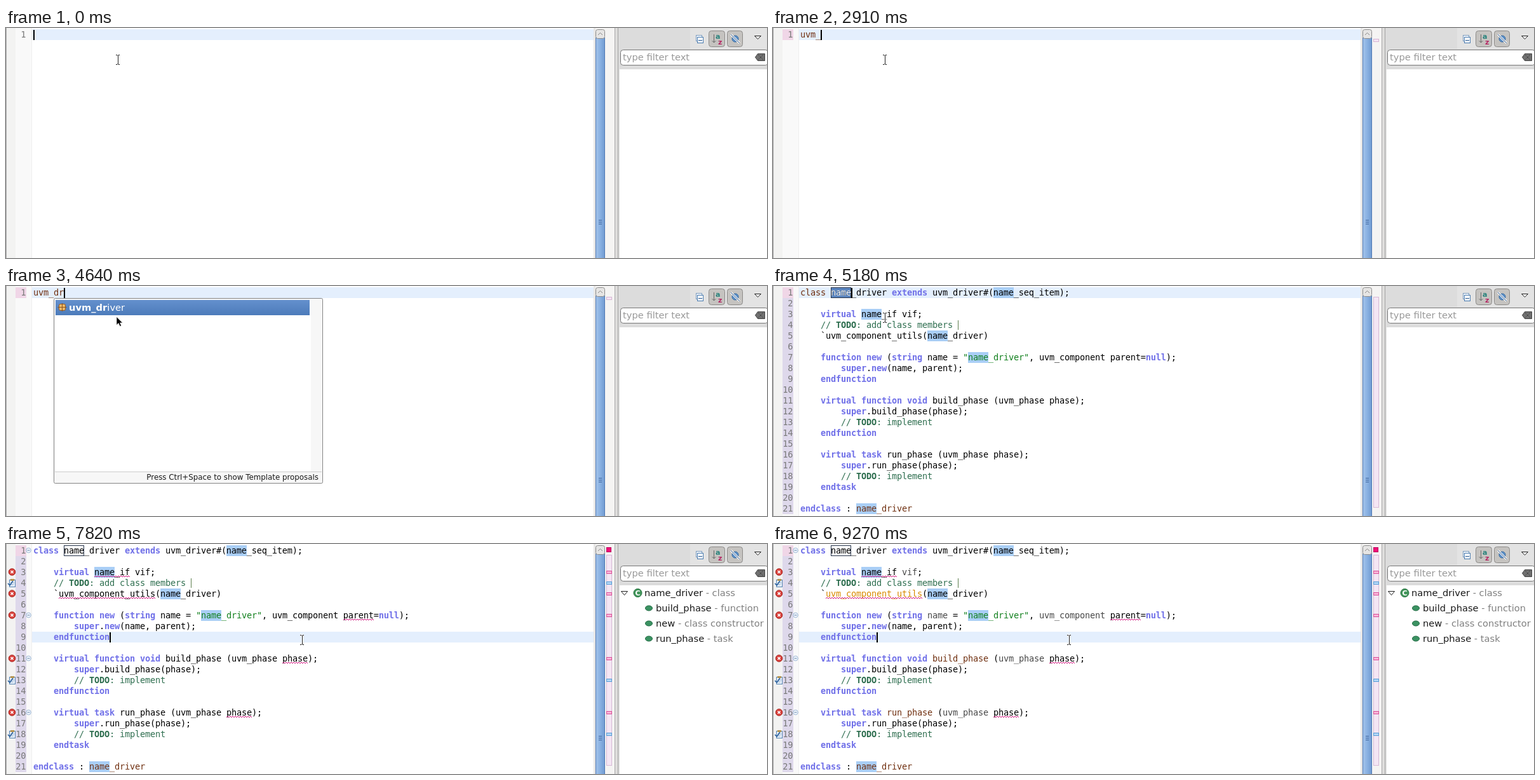
Write an HTML page that moves like this. It is 1198 by 362 pixels and loops after 9.36 s.

```html
<!DOCTYPE html>
<html lang="en">
<head>
<meta charset="utf-8">
<title>Code template demo</title>
<style>
html, body { margin: 0; width: 100%; height: 100%; overflow: hidden; background: #fff; }
svg { display: block; width: 1198px; height: 362px; }
text { white-space: pre; }
.mono { font: 13.6px "DejaVu Sans Mono", monospace; letter-spacing: -.188px; }
.ui { font: 14.67px "DejaVu Sans", sans-serif; fill: #1a1a1a; }
.kw { fill: #7070e8; font-weight: bold; }
.com { fill: #2f6f50; }
.str { fill: #12801e; }
.todo, .bold { font-weight: bold; }
.br, .c { fill: #703010; }
.num { fill: #787878; text-anchor: end; }
.dim { fill: #808080; }
.checked .c { fill: #7070e8; font-weight: bold; }
.colored .m { fill: #d98a00; }
.colored .f { fill: #703010; }
.colored .v { fill: #484848; }
</style>
</head>
<body>
<svg id="stage" viewBox="0 0 1198 362" xmlns="http://www.w3.org/2000/svg">
  <defs>
    <linearGradient id="thumb"><stop stop-color="#a3c3ea"/><stop offset=".5" stop-color="#8ab1e2"/><stop offset="1" stop-color="#709bd2"/></linearGradient>
    <linearGradient id="selected" x2="0" y2="1"><stop stop-color="#6490cd"/><stop offset="1" stop-color="#4c7bba"/></linearGradient>
    <clipPath id="list"><path d="M78 22H480V292H78Z"/></clipPath>
  </defs>
  <g id="frame"></g>
  <g id="editor"></g>
  <g id="panel"></g>
  <g id="popup"></g>
  <g id="pointer"></g>
</svg>
<script>
const LOOP = 9360, LEFT = 43, CELL = 8, ROW = 17;
const INSERT = 4820, CLICK = 6370, CHECK = 7270, COLOR = 8090;
const POPUP = 3270;
const keys = [[2270, "u"], [2450, "v"], [2640, "m"], [2820, "_"], [4270, "d"], [4450, "r"]];

// {m ...} macro, {f ...} function, {v ...} variable or type, {c ...} class keyword
const source = [
  "{c class} name_driver extends uvm_driver#(name_seq_item);", "",
  "    virtual name_if {v vif};",
  "    // TODO: add class members ",
  "    `{m uvm_component_utils}(name_driver)", "",
  "    function new (string {v name} = \"name_driver\", {v uvm_component} parent=null);",
  "        super.new(name, parent);",
  "    endfunction", "",
  "    virtual function void {f build_phase} ({v uvm_phase} phase);",
  "        super.build_phase(phase);",
  "        // TODO: implement",
  "    endfunction", "",
  "    virtual task {f run_phase} ({v uvm_phase} phase);",
  "        super.run_phase(phase);",
  "        // TODO: implement",
  "    endtask", "",
  "endclass : {br name_driver}"
];
const proposals = ["uvm_pkg", "`UVM_TLM_FIFO_TASK_ERROR", "`UVM_TLM_NB_BW_MASK", "`M_UVM_QUEUE_RESIZE()",
  "`uvm_do_seq_with()", "`uvm_unpack_queue()", "`uvm_message_context_end", "`m_uvm_record_qda_object()",
  "`uvm_print_sarray_string2()", "`uvm_component_param_utils()", "`uvm_do_on_pri_with()", "`uvm_field_int()"];
const errors = [[3, 12, 7], [5, 5, 19], [7, 61, 6], [11, 49, 5], [16, 38, 5]];
const tasks = [4, 13, 18];
const occurrences = [[1, 38], [3, 12], [5, 25], [7, 33], [21, 11]];

const $ = id => document.getElementById(id);
const rowY = n => 2 + ROW * (n - 1);
const colX = n => LEFT + CELL * n;
const rect = (x, y, w, h, fill, more = "") => `<rect x="${x}" y="${y}" width="${w}" height="${h}" fill="${fill}" ${more}/>`;
const box = (x, y, w, h, fill, stroke, r = 0) => rect(x + .5, y + .5, w - 1, h - 1, fill, `stroke="${stroke}" rx="${r}"`);
const path = (d, stroke, fill = "none", more = "") => `<path d="${d}" stroke="${stroke}" fill="${fill}" ${more}/>`;
const text = (x, y, body, cls, more = "") => `<text x="${x}" y="${y}" class="${cls}" ${more}>${body}</text>`;
const span = (cls, body) => `<tspan class="${cls}">${body}</tspan>`;
const during = (from, to, body) => `<g data-from="${from}" data-to="${to}">${body}</g>`;
const grip = (x, y) => path([0, 3, 6].map(d => `M${x} ${y + d}h5`).join(""), "#3d639c");

function highlight(line) {
  const token = /\/\/ TODO(.*)|"[^"]*"|\{(\w+) ([^}]*)\}|\b(extends|virtual|function|new|string|null|super|endfunction|void|task|endtask|endclass)\b/g;
  return line.trimStart().replace(token, (all, note, cls, body) =>
    note !== undefined ? span("com", "// " + span("todo", "TODO") + note)
      : cls ? span(cls, body)
      : span(all[0] === '"' ? "str" : "kw", all));
}

function squiggle(line, col, length) {
  let d = `M${colX(col)} ${rowY(line) + 16}`;
  for (let i = 0; i < length * 2; i++) d += "l2 -2l2 2";
  return path(d, "#d0107c");
}

function drawFrame() {
  const arrowButton = box(928, 2, 15, 15, "#e6e5e4", "#8b8b8b", 3) + path("M932 11l3.5 -3.5l3.5 3.5", "#888");
  $("frame").innerHTML =
    rect(0, 0, 1, 362, "#aaa") + rect(1, 0, 14, 362, "#f3f3f2") + rect(15, 0, 25, 362, "#f9f9f9") +
    rect(40, 0, 1, 362, "#eee") + rect(925, 0, 33, 362, "#f5f4f3") + rect(925, 0, 3, 362, "#e8e7e6") +
    box(928, 15, 15, 360, "url(#thumb)", "#5079b4") + arrowButton + grip(933, 302.5) +
    rect(958, 0, 7, 362, "#dedddc") + rect(958, 0, 1, 362, "#aaa") + rect(963, 0, 1, 362, "#a2a2a2") +
    rect(965, 0, 233, 65, "#dcdcdc") + rect(1077, 0, 121, 33, "#e3e3e3") + rect(965, 65, 1, 297, "#ddd");
}

function drawPanel() {
  const collapse = box(1086, 11, 10, 10, "#eef4fb", "#7d9cbe") + box(1088, 14, 10, 10, "#fff", "#4779ae") +
    path("M1090 19.5h6", "#26578f");
  const sort = box(1106, 4, 26, 26, "#c5c3c0", "#8d8b89", 4) + path("M1114.5 10v13m-3 -3l3 3l3 -3", "#666") +
    text(1117, 17, "a", "ui bold", 'style="font-size:11px;fill:#23817a"') +
    text(1121, 26, "z", "ui bold", 'style="font-size:11px;fill:#b52864"');
  const hide = box(1135, 4, 25, 26, "#c5c3c0", "#8d8b89", 4) +
    '<circle cx="1148" cy="17" r="5" fill="#5e91c8" stroke="#35689f"/>' +
    path("M1141 10l14 14", "#fff", "none", 'stroke-width="3"') + path("M1141 10l14 14", "#254f83");
  const field = box(967, 34, 233, 25, "#fff", "#777", 4) + text(971, 51, "type filter text", "ui", 'style="fill:#999"') +
    path("M1183.500 40.500h11v11h-11l-4 -5.500z", "#444", "#707070") +
    path("M1184 42l8 8m0 -8l-8 8", "#333", "none", 'stroke-dasharray="1 1"');
  const member = (y, name, kind) => `<ellipse cx="1012" cy="${y - 5}" rx="5.500" ry="4" fill="#3b9262" stroke="#226b44"/>` +
    text(1023, y, `${name}${span("dim", " - " + kind)}`, "ui");
  const outline = path("M968.500 74.500h10l-5 6z", "#222", "#fff") +
    '<circle cx="994.500" cy="77" r="6.500" fill="#43965b" stroke="#267241"/>' +
    text(990.5, 81, "C", "ui bold", 'style="font-size:11px;fill:#fff"') +
    text(1005, 82, "name_driver" + span("dim", " - class"), "ui") +
    member(106, "build_phase", "function") + member(130, "new", "class constructor") + member(154, "run_phase", "task");
  $("panel").innerHTML = collapse + sort + hide + path("M1178.500 12.500h10l-5 5z", "#222", "#fff") + field + during(CHECK, LOOP, outline);
}

function drawEditor() {
  const number = n => text(31.2, rowY(n) + 13, n, "mono num");
  const lineBand = n => rect(41, rowY(n), 884, ROW, "#e4effd");
  const added = source.map((_, i) => i ? rect(15, rowY(i + 1), 17, ROW, "#ded8eb") + number(i + 1) : "").join("");
  const marks = occurrences.map(([line, col]) => rect(colX(col), rowY(line), CELL * 4, ROW, "#a9cef6")).join("");
  const code = source.map((line, i) =>
    text(colX(line.length - line.trimStart().length), rowY(i + 1) + 13, highlight(line), "mono")).join("");
  const ruler = (line, fill, stroke) => box(945, rowY(line) + 6, 9, 5, fill, stroke);
  const problem = ([line, col, length]) => {
    const y = rowY(line) + 8;
    return squiggle(line, col, length) + ruler(line, "#f8b6d8", "#d84e98") +
      `<circle cx="9.500" cy="${y}" r="5.300" fill="#d9413c" stroke="#a82824"/>` +
      path(`M7.500 ${y - 2}l4 4m0 -4l-4 4`, "#fff", "none", 'stroke-width="1.600"');
  };
  const task = line => {
    const y = rowY(line);
    return ruler(line, "#b5d7f6", "#569bd5") + box(5, y + 3, 10, 12, "#eaf2fb", "#5583b0") +
      rect(7, y + 2, 6, 3, "#b89652") + path(`M7 ${y + 8}h6m-6 3h5`, "#80a2c6") + path(`M3 ${y + 9}l3 3l5 -7`, "#285f9c", "none", 'stroke-width="1.500"');
  };
  const fold = line => `<circle cx="35.500" cy="${rowY(line) + 8}" r="3.800" fill="#eff5fc" stroke="#9eb8d6"/>` +
    path(`M33.500 ${rowY(line) + 8}h4`, "#6486ad");

  $("editor").innerHTML =
    during(0, CLICK, lineBand(1)) + during(CLICK, LOOP, lineBand(9)) +
    during(keys[0][0], LOOP, rect(15, 2, 17, ROW, "#f0d6e7")) + number(1) +
    during(keys[0][0], INSERT, box(945, 17, 9, 5, "#f4e4f3", "#d7b6d4")) +
    during(INSERT, LOOP, box(945, 17, 9, 332, "#f4e6f4", "#d8bad6") + added + marks) +
    during(INSERT, CLICK, rect(91, 2, 32, ROW, "#5b85bf")) +
    during(INSERT, LOOP, code + box(91, 2, 32, 17, "none", "#26334a") + rect(291, 54, 1, 15, "#5f8050")) +
    during(INSERT, CLICK, text(91, 15, "name", "mono", 'fill="#fff"')) +
    during(CHECK, LOOP, errors.map(problem).join("") + tasks.map(task).join("") +
      [1, 7, 11, 16].map(fold).join("") + box(945, 5, 8, 8, "#f01078", "#bd0860")) +
    '<text id="typed" class="mono br" x="43" y="15"></text><rect id="caret" width="2" height="16" fill="#000"/>';
}

function drawPopup() {
  const row = (name, i, prefix, red) => {
    const y = 39 + 24 * i;
    const icon = red ? box(86, y - 7, 5, 5, "#fff", "#b73449")
      : box(83, y - 11, 11, 11, "#e9b767", "#92571f", 2) + path(`M88.500 ${y - 12}v13m-7 -6.500h14`, "#92571f");
    return icon + text(99, y, name.replace(new RegExp(prefix, "i"), hit => span("bold", hit)), "ui", i ? "" : 'style="fill:#fff"');
  };
  const list = (names, prefix) => rect(78, 22, 400, 24, "url(#selected)") +
    names.map((name, i) => row(name, i, prefix, name[0] === "`")).join("");
  const [, d] = [0, keys[4][0]], r = keys[5][0];
  const bar = rect(481, 22, 15, 270, "#c6c5c3") + box(481, 37, 15, 30, "url(#thumb)", "#5079b4", 1) + grip(486, 48.5) +
    box(481, 22, 15, 15, "#ebeae9", "#8b8b8b", 3) + box(481, 277, 15, 15, "#ebeae9", "#8b8b8b", 3) +
    path("M485 31l3.500 -3.500l3.500 3.500", "#999") + path("M485 283l3.500 3.500l3.500 -3.500", "#333");
  $("popup").innerHTML = during(POPUP, INSERT,
    box(75, 19, 424, 292, "#f7f7f7", "#858585", 2) + rect(78, 22, 402, 270, "#fff") + rect(77, 292, 420, 1, "#ccc") +
    text(492, 305, "Press Ctrl+Space to show Template proposals", "ui", 'text-anchor="end" style="font-size:11.85px"') +
    '<g clip-path="url(#list)">' + during(POPUP, d, list(proposals, "uvm_")) +
    during(d, r, list(proposals.filter(name => name.includes("uvm_d")), "uvm_d")) +
    during(r, INSERT, list(["uvm_driver"], "uvm_dr")) + "</g>" + during(POPUP, d, bar));
}

function drawPointer() {
  const beam = "M-3 -7.500h2l1 1l1 -1h2M0.500 -7v14M-3 7.500h2l1 -1l1 1h2";
  const iBeam = path(beam, "#fff", "none", 'stroke-width="2.500"') + path(beam, "#222");
  $("pointer").innerHTML = during(0, POPUP, iBeam) + during(INSERT, LOOP, iBeam) +
    during(POPUP, INSERT, path("M-2 -1.500v13l3 -3l2.500 5l2 -1l-2 -4.500h4z", "#fff", "#000", 'stroke-width=".6"'));
}

const ease = (t, from, to) => {
  const p = Math.min(1, Math.max(0, (t - from) / (to - from)));
  return p * p * (3 - 2 * p);
};

drawFrame();
drawEditor();
drawPanel();
drawPopup();
drawPointer();
const timed = [...document.querySelectorAll("[data-from]")].map(el => ({ el, from: +el.dataset.from, to: +el.dataset.to }));
const start = performance.now();

function render() {
  const t = Math.max(0, performance.now() - start) % LOOP;
  for (const { el, from, to } of timed) el.style.display = t >= from && t < to ? "" : "none";
  $("stage").classList.toggle("checked", t >= CHECK);
  $("stage").classList.toggle("colored", t >= COLOR);

  const typed = t < INSERT ? keys.filter(([at]) => t >= at).map(([, key]) => key).join("") : "";
  $("typed").textContent = typed;
  const col = t < INSERT ? typed.length : t < CLICK ? 10 : 15;
  $("caret").setAttribute("x", colX(col));
  $("caret").setAttribute("y", t < CLICK ? 3 : rowY(9) + 1);

  const move = ease(t, 5900, 6300), drift = ease(t, 6820, 7100);
  $("pointer").setAttribute("transform", `translate(${176 + 287 * move + 3 * drift} ${50 + 99 * move + 2 * drift})`);
  requestAnimationFrame(render);
}
render();
</script>
</body>
</html>
```
